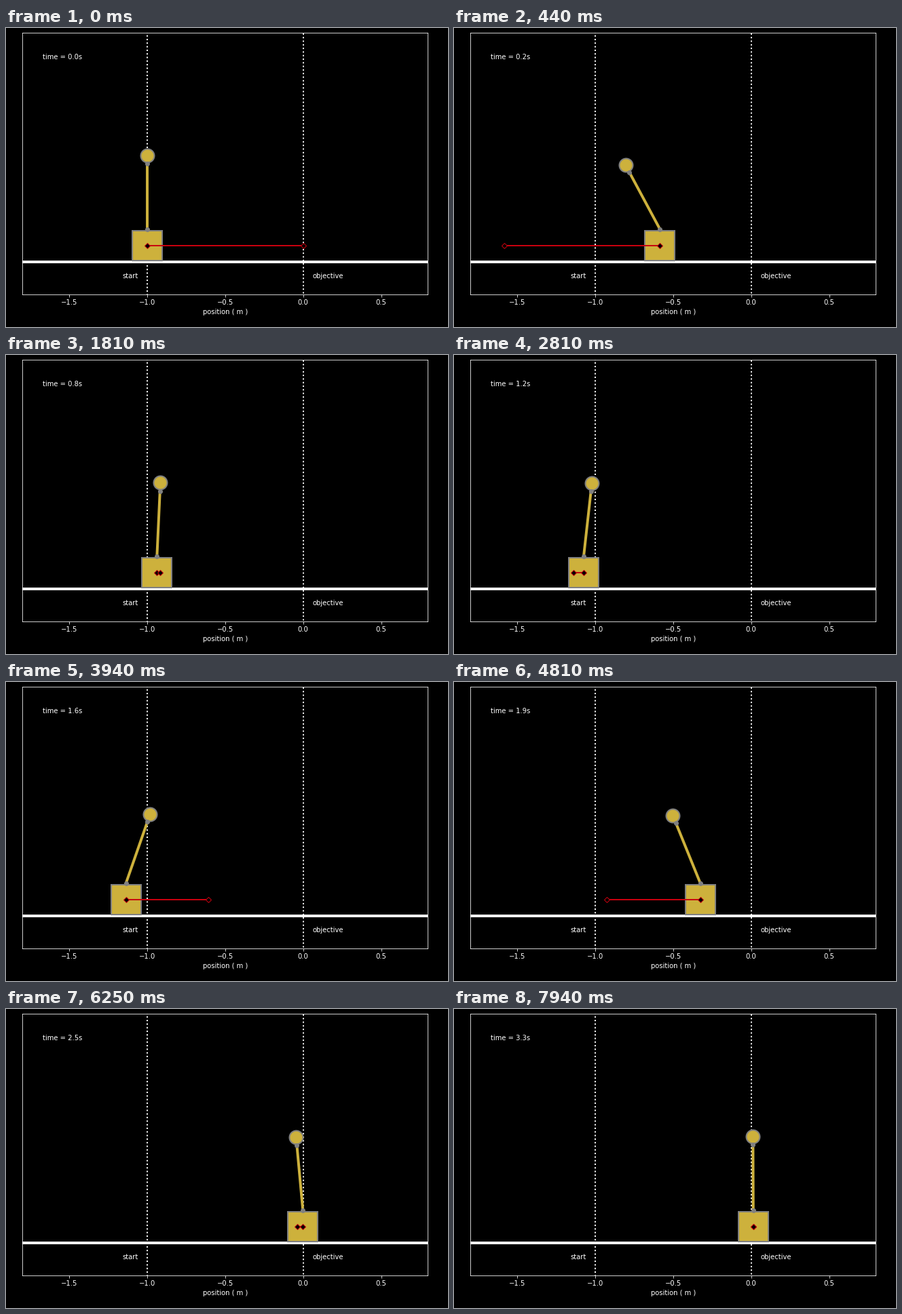
A matplotlib script for the animation above (8 s loop, 651 by 441 pixels).

```python
import numpy as np
import matplotlib.pyplot as plt
from matplotlib.animation import FuncAnimation

W, H, DPI = 651, 441, 72
FRAMES, INTERVAL = 320, 25        # the pose moves on 16 times a second
LEFT, RIGHT, BOTTOM, TOP = 24.4, 621.45, 47.6, 433.6
GOLD, EDGE, FORCE = '#cdb13c', 'gray', '#c8000e'
ROD, REACH, RIDE = 0.4, 0.45, -0.1

plt.rcParams.update({
    'font.family': 'DejaVu Sans', 'font.size': 10, 'text.color': 'white',
    'axes.edgecolor': 'white', 'axes.labelcolor': 'white',
    'xtick.color': 'white', 'axes.facecolor': 'black',
    'figure.facecolor': 'black',
})

# key poses: step, cart position, pole angle, push
POSES = np.array([
    (0, -1, 0, 1),
    (3, -.917, -.11, 1),
    (7, -.585, -.513, -1),
    (12, -.56, -.47, -1),
    (18, -.78, -.18, .15),
    (29, -.938, .0485, .021),
    (51, -1.14, .17, -.1),
    (57, -1.23, .28, -1),
    (63, -1.137, .351, .53),
    (67, -.95, .2, .95),
    (73, -.53, -.27, -.75),
    (77, -.326, -.403, -.6),
    (86, -.12, -.28, -.2),
    (100, -.002, -.097, -.034),
    (127, .013, -.004, 0),
])
KEYS, CART, ANGLE, PUSH = POSES.T


def glide(k, y):
    """Cubic Hermite curve through the key values, read at step k."""
    m = np.gradient(y, KEYS)
    i = min(np.searchsorted(KEYS, k, side='right') - 1, len(KEYS) - 2)
    h = KEYS[i + 1] - KEYS[i]
    s = (k - KEYS[i]) / h
    return ((1 + 2 * s) * (1 - s)**2 * y[i] + s * (1 - s)**2 * h * m[i]
            + s**2 * (3 - 2 * s) * y[i + 1] + s**2 * (s - 1) * h * m[i + 1])


def clock(k):
    return np.interp(k, [0, 29, 77, 127], [0, 0.755, 1.942, 3.257])


fig = plt.figure(figsize=(W / DPI, H / DPI), dpi=DPI)
ax = fig.add_axes([LEFT / W, BOTTOM / H, (RIGHT - LEFT) / W,
                   (TOP - BOTTOM) / H], xlim=(-1.8, 0.8), ylim=(-0.4, 1.2))
ax.set_xlabel('position ( m )')
ax.set_xticks(np.arange(-1.5, 0.6, 0.5))
ax.get_yaxis().set_visible(False)

ax.plot([-1.8, 0.8], [-0.2, -0.2], 'w-', lw=4)
ax.plot([-1, -1], [-1.5, 1.5], 'w:', lw=2)
ax.plot([0, 0], [-0.5, 1.5], 'w:', lw=2)
ax.text(-1.06, -0.3, 'start', ha='right')
ax.text(0.06, -0.3, 'objective', ha='left')
time_text = ax.text(0.05, 0.9, '', transform=ax.transAxes)


def mass(marker, size):
    return ax.plot([], [], ls='none', marker=marker, ms=size,
                   color=GOLD, mec=EDGE, mew=2)[0]


block = mass('s', 44)
bob = mass('o', 20)
rod, = ax.plot([], [], 'o-', color=GOLD, lw=4, ms=6, mec=EDGE, mfc=EDGE)
force, = ax.plot([], [], 'D-', color=FORCE, lw=2, ms=6,
                 mec=FORCE, mfc='black', mew=1)


def update(i):
    k = (2 * i + 1) // 5
    x, a = glide(k, CART), glide(k, ANGLE)
    u = np.interp(k, KEYS, PUSH)
    dx, dy = np.sin(a), np.cos(a)
    block.set_data([x], [RIDE])
    bob.set_data([x + REACH * dx], [REACH * dy])
    rod.set_data([x, x + ROD * dx], [0, ROD * dy])
    force.set_data([x, x + u], [RIDE, RIDE])
    time_text.set_text(f'time = {clock(k):.1f}s')
    return block, bob, rod, force, time_text


anim = FuncAnimation(fig, update, frames=FRAMES, interval=INTERVAL,
                     repeat=True, repeat_delay=0)
plt.show()
```
